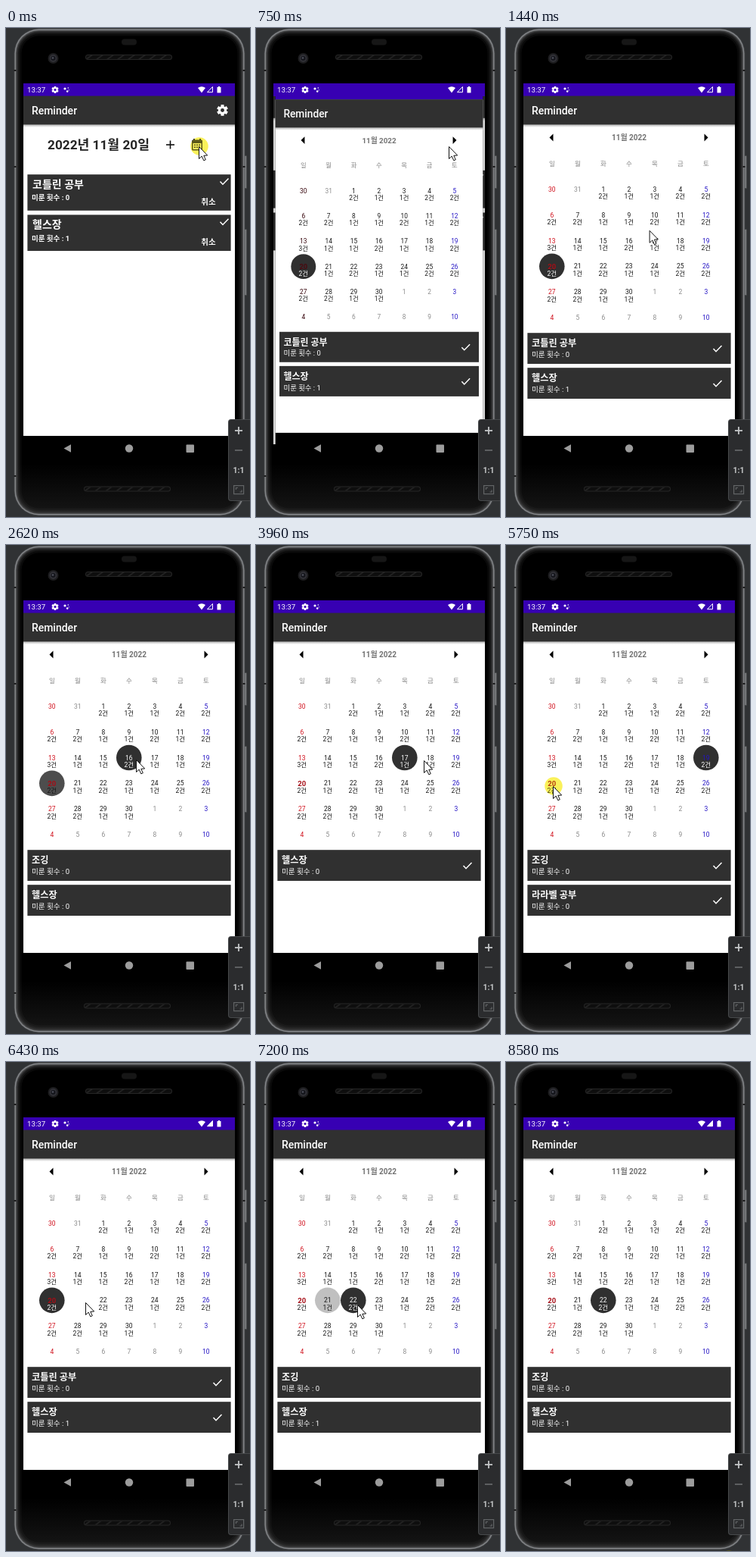
Recreate the animation shown at these times as an HTML page with a canvas. Size 323 by 645 pixels, loop 8710 ms.

```html
<!DOCTYPE html>
<html lang="ko">
<head>
<meta charset="utf-8">
<title>Reminder</title>
<style>
html, body { margin: 0; width: 100%; height: 100%; overflow: hidden; background: #303234; }
canvas { display: block; width: 323px; height: 645px; }
</style>
</head>
<body>
<canvas id="stage"></canvas>
<script>
const W = 323, H = 645, LOOP = 8710;
const FONT = 'Roboto, "Noto Sans CJK KR", "Noto Sans CJK", sans-serif';
const DARK = '#303030', PURPLE = '#3700b3', FADE = 300;
const canvas = document.getElementById('stage');
const dpr = window.devicePixelRatio || 1;
canvas.width = W * dpr;
canvas.height = H * dpr;
const g = canvas.getContext('2d');

// Items per day, 1 to 30 November
const counts = '211222211212311211221211222211';
const gym = ['헬스장', 0, true];
const agenda = {
  20: [['코틀린 공부', 0, true], ['헬스장', 1, true]],
  16: [['조깅', 0], ['헬스장', 0]],
  17: [gym],
  18: [gym],
  19: [['조깅', 0, true], ['라라벨 공부', 0, true]],
  21: [['헬스장', 0]],
  22: [['조깅', 0], ['헬스장', 1]]
};
const picks = [[-1000, 20], [2578, 16], [3320, 17], [4150, 18], [4918, 19], [5860, 20], [6500, 21], [6990, 22]];
const presses = [2420, 3220, 4020, 4710, 5750, 6230, 6860];
const route = [
  [0, 255, 156], [1160, 255, 156], [1420, 196, 262], [1570, 148, 298], [1720, 188, 292],
  [1920, 188, 292], [2270, 172, 283], [2780, 172, 283], [2960, 192, 285], [3820, 192, 285],
  [3960, 222, 284], [4450, 222, 284], [4640, 262, 285], [4920, 262, 285], [4990, 239, 292],
  [5490, 62, 318], [6040, 62, 318], [6200, 105, 317], [6640, 105, 317], [6840, 134, 320],
  [7300, 134, 320], [7480, 215, 389], [7550, 215, 389], [8180, 283, 648], [8580, 294, 656]
];

const clamp = v => Math.max(0, Math.min(1, v));

function rect(x, y, w, h, color) {
  g.fillStyle = color;
  g.fillRect(x, y, w, h);
}

function round(x, y, w, h, r, color) {
  g.beginPath();
  g.roundRect(x, y, w, h, r);
  g.fillStyle = color;
  g.fill();
}

function disc(x, y, r, color) {
  g.beginPath();
  g.arc(x, y, r, 0, Math.PI * 2);
  g.fillStyle = color;
  g.fill();
}

function poly(points, fill, stroke, width) {
  g.beginPath();
  points.forEach(p => g.lineTo(p[0], p[1]));
  if (fill) { g.closePath(); g.fillStyle = fill; g.fill(); }
  if (stroke) { g.strokeStyle = stroke; g.lineWidth = width; g.stroke(); }
}

// y is the vertical middle of the digits
function text(s, x, y, size, color, weight = 400, align = 'left') {
  g.font = `${weight} ${size}px ${FONT}`;
  g.textAlign = align;
  g.fillStyle = color;
  g.fillText(s, x, y + size * 0.36);
}

function check(x, y) {
  poly([[x - 5.5, y], [x - 2, y + 3.7], [x + 5.5, y - 4]], null, '#fff', 1.5);
}

function gear(x, y, r, hole) {
  g.save();
  g.translate(x, y);
  for (let i = 0; i < 6; i++) {
    g.rotate(Math.PI / 3);
    rect(-r * 0.28, -r, r * 0.56, r, '#fff');
  }
  disc(0, 0, r * 0.76, '#fff');
  disc(0, 0, r * 0.34, hole);
  g.restore();
}

function grille(x, y) {
  round(x, y, 115, 7, 3.5, '#262626');
  g.save();
  g.beginPath();
  g.roundRect(x + 1, y + 1, 113, 5, 2.5);
  g.clip();
  rect(x, y, 115, 7, '#0e0e0e');
  for (let i = 0; i < 9; i++) {
    const left = x + i * 14;
    poly([[left, y + 6], [left + 7, y + 1], [left + 10, y + 1], [left + 3, y + 6]], '#232323');
  }
  g.restore();
}

function sideButton(y, h) {
  round(315, y, 4, h, 1.5, '#4a4c4e');
  rect(316, y + 1, 1.6, h - 2, '#9a9c9e');
}

function device() {
  rect(0, 0, W, H, '#303234');
  sideButton(168, 44);
  sideButton(265, 88);
  const rims = [[0, '#3f4143'], [1, '#85878a'], [2.4, '#4c4d4e'], [3.8, '#2a2a2b'], [5.5, '#171717'], [7.5, '#0a0a0a'], [10, '#000']];
  for (const [inset, color] of rims) {
    round(10.5 + inset, 0.5 + inset, 306 - inset * 2, 643 - inset * 2, 33 - inset, color);
  }
  const sheen = g.createLinearGradient(0, 575, 0, 638);
  sheen.addColorStop(0, 'rgba(60,60,60,0)');
  sheen.addColorStop(1, 'rgba(60,60,60,0.35)');
  round(14, 575, 299, 65, [0, 0, 29, 29], sheen);
  for (const y of [55, 182, 590]) {
    rect(10.5, y, 3, 2, '#1c1c1d');
    rect(313.5, y, 3, 2, '#1c1c1d');
  }
  disc(62.5, 40, 7, '#1d1d1f');
  disc(62.5, 40, 5, '#303036');
  disc(62.5, 40, 3, '#15161c');
  disc(62, 39.5, 1.3, '#4e515c');
  round(153, 14.5, 20, 8, 4, '#161616');
  grille(105, 35);
  grille(103, 604.5);
}

function statusBar(t) {
  text('13:37', 28, 81.5, 9.7, '#fff');
  gear(65, 81.5, 4.6, PURPLE);
  disc(78, 80, 1.6, '#fff');
  disc(82.3, 79, 0.8, '#fff');
  disc(81.2, 83.6, 1.3, '#fff');
  disc(83.2, 81.8, 0.6, '#fff');
  g.beginPath();
  g.moveTo(259, 85.5);
  g.lineTo(254, 79);
  g.quadraticCurveTo(259, 75.5, 264, 79);
  g.fillStyle = '#fff';
  g.fill();
  const full = t > 6000;
  poly([[266.5, 84.7], [273.5, 84.7], [273.5, 77.5], [266.5, 84.7]], full && '#fff', '#fff', 1);
  rect(279.5, 78, 5, 7.5, '#fff');
  rect(281, 77, 2, 1, '#fff');
}

function appBar() {
  rect(23, 73, 280, 498, '#000');
  rect(23, 73, 280, 17, PURPLE);
  rect(23, 90, 280, 448, '#fff');
  const shade = g.createLinearGradient(0, 127, 0, 131);
  shade.addColorStop(0, '#aaa');
  shade.addColorStop(1, '#fff');
  rect(23, 127, 280, 4, shade);
  rect(23, 89.6, 280, 37.8, DARK);
  text('Reminder', 33.9, 108.7, 14, '#fff', 500);
}

function homePage() {
  appBar();
  gear(286.5, 108.5, 7.3, DARK);
  text('2022년 11월 20일', 122.5, 154, 17.2, '#252525', 700, 'center');
  rect(212, 153.2, 11, 1.6, '#111');
  rect(216.7, 148.5, 1.6, 11, '#111');
  round(246, 147.5, 14, 14, 1.5, '#333');
  rect(248, 146, 2, 2, '#333');
  rect(256, 146, 2, 2, '#333');
  rect(247.5, 152, 11, 8, '#fff');
  for (let i = 0; i < 6; i++) rect(249 + i % 3 * 3, 153.5 + (i > 2 ? 3 : 0), 2, 1.6, '#333');
  agenda[20].forEach((item, i) => {
    const y = 193.2 + i * 53.2;
    rect(28.4, y, 269.2, 47.6, DARK);
    text(item[0], 35, y + 12.8, 14, '#fff', 700);
    text('미룬 횟수 : ' + item[1], 34, y + 30.8, 9.5, '#fff', 700);
    text('취소', 268, y + 35.8, 10.5, '#fff', 700, 'center');
    check(289, y + 9.3);
  });
}

function dayColor(col, inside, settled) {
  if (col === 0) return settled ? '#d0101c' : '#330008';
  if (col === 6) return '#2414c4';
  return inside ? '#161616' : '#8a8a8a';
}

function calendarPage(t) {
  appBar();
  const settled = t >= 960;
  poly([[57.5, 144.5], [62.5, 139.5], [62.5, 149.5]], '#000');
  poly([[267.5, 144.5], [262.5, 139.5], [262.5, 149.5]], '#000');
  text('11월 2022', 163, 144.5, 10, '#727272', 700, 'center');

  const now = picks.findLastIndex(p => p[0] <= t);
  const chosen = picks[now][1];
  const last = now > 0 ? picks[now - 1][1] : 0;
  const left = 1 - clamp((t - picks[now][0]) / FADE);
  const next = picks[now + 1];
  const pending = next && t >= next[0] - 75 ? next[1] : 0;

  for (let col = 0; col < 7; col++) {
    const x = 60.8 + col * 34;
    text('일월화수목금토'[col], x, 178.5, 8.5, '#858585', 400, 'center');
    for (let row = 0; row < 6; row++) {
      const n = row * 7 + col - 1;
      const inside = n > 0 && n < 31;
      const day = n < 1 ? n + 31 : n > 30 ? n - 30 : n;
      const y = 212.8 + row * 33.85;
      const active = inside && n === chosen;
      if (active) disc(x, y, 16.8, DARK);
      else if (inside && n === last && left > 0) disc(x, y, 16.8, `rgba(48,48,48,${left})`);
      const lit = active || (inside && n === pending);
      let color = dayColor(col, inside, settled);
      if (lit && col % 6) color = '#fff';
      const today = n === 20;
      if (today) color = settled ? '#a60d16' : '#4a0a10';
      text(day, x, y, today ? 9.5 : 8.5, color, today ? 700 : 400, 'center');
      if (inside) text(counts[n - 1] + '건', x, y + 9.4, 8.5, lit ? '#fff' : '#161616', 400, 'center');
    }
  }

  agenda[chosen].forEach((item, i) => {
    const y = 402.2 + i * 46;
    rect(28.4, y, 269.2, 40.8, DARK);
    text(item[0], 34, y + 13.8, 12.2, '#fff', 700);
    text('미룬 횟수 : ' + item[1], 34, y + 28.8, 9.6, '#fff');
    if (item[2]) check(280, y + 20.8);
  });
}

function scaled(k, alpha, draw) {
  g.save();
  g.globalAlpha = alpha;
  g.translate(163, 313.3);
  g.scale(k, k);
  g.translate(-163, -313);
  draw();
  g.restore();
}

function screen(t) {
  g.save();
  g.beginPath();
  g.rect(23, 73, 280, 498);
  g.clip();
  if (t < 610) homePage();
  else if (t >= 960) calendarPage(t);
  else {
    const p = (t - 610) / 350, rest = (1 - p) ** 4;
    scaled(1 + 0.055 * (1 - rest), 1, homePage);
    rect(23, 90, 280, 481, `rgba(0,0,0,${0.15 * clamp(p * 3)})`);
    scaled(1 - 0.15 * rest, clamp((t - 610) / 90), () => calendarPage(t));
    rect(23, 73, 280, 17, PURPLE);
  }
  g.restore();
  statusBar(t);
  poly([[76.5, 554.5], [86, 549.3], [86, 559.7]], '#9c9c9c');
  disc(163, 554.5, 5.2, '#9c9c9c');
  round(238.5, 549.5, 10.5, 10.5, 1, '#9c9c9c');
}

function toolbar() {
  round(294, 516, 34, 108, 4, '#47494b');
  round(295, 517, 34, 106, 3, '#2b2c2e');
  rect(303, 530.2, 10, 1.8, '#c4c6c8');
  rect(307.1, 526, 1.8, 10, '#c4c6c8');
  rect(303, 556.3, 10, 1.4, '#737577');
  text('1:1', 308, 583, 10.5, '#c4c6c8', 700, 'center');
  g.strokeStyle = '#626466';
  g.lineWidth = 1.2;
  g.strokeRect(301.6, 603.6, 13, 11);
  poly([[304.5, 609], [304.5, 606.5], [307, 606.5]], null, '#626466', 1.2);
  poly([[312, 609.5], [312, 612], [309.5, 612]], null, '#626466', 1.2);
}

function pointerAt(t) {
  const i = route.findLastIndex(p => p[0] <= t);
  const a = route[i], b = route[i + 1] || a;
  const k = b === a ? 0 : (t - a[0]) / (b[0] - a[0]);
  return [a[1] + (b[1] - a[1]) * k, a[2] + (b[2] - a[2]) * k];
}

function glowAt(t) {
  if (t >= 8580) return 1;
  if (t < 330) return 1 - clamp((t - 140) / 190);
  const start = presses.findLast(p => p <= t);
  return start ? 1 - clamp((t - start - 90) / 90) : 0;
}

// Highlighter look: tints light areas, keeps dark ones dark
function glow(x, y, strength) {
  g.save();
  g.globalAlpha = strength;
  g.globalCompositeOperation = 'multiply';
  disc(x, y, 11.7, '#fdf468');
  g.globalCompositeOperation = 'source-over';
  disc(x, y, 11.7, 'rgba(240,232,40,0.22)');
  g.restore();
}

function pointer(t) {
  const [x, y] = pointerAt(t);
  const strength = glowAt(t);
  if (strength > 0) glow(x + 1, y, strength);
  g.save();
  g.translate(x + 0.5, y + 0.5);
  g.lineJoin = 'round';
  poly([[0, 0], [0, 16], [3.7, 12.6], [6.3, 18.3], [8.8, 17.2], [6.3, 11.8], [11.2, 11.5], [0, 0]], '#fff', '#111', 1);
  g.restore();
}

let begin;
function frame(now) {
  begin ??= now;
  const t = (now - begin) % LOOP;
  g.setTransform(dpr, 0, 0, dpr, 0, 0);
  device();
  screen(t);
  toolbar();
  pointer(t);
  requestAnimationFrame(frame);
}
requestAnimationFrame(frame);
</script>
</body>
</html>
```
